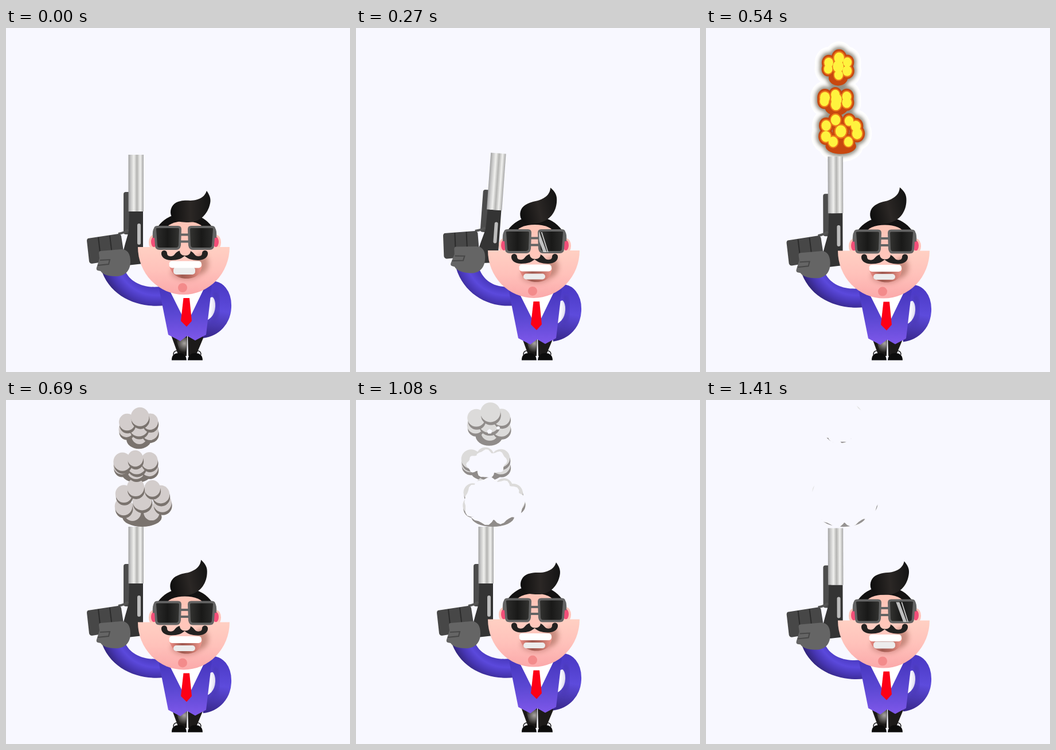
These frames come from a looping animation (600x600 px, 1440 ms). An HTML page:

```html
<!DOCTYPE html>
<html lang="en">
<head>
<meta charset="utf-8">
<title>Agent with pistol</title>
<style>
html, body { margin: 0; width: 100%; height: 100%; overflow: hidden; background: #f8f8ff; }
svg { display: block; width: 100vw; height: 100vh; }
</style>
</head>
<body>
<svg viewBox="0 0 600 600" xmlns="http://www.w3.org/2000/svg">
<defs>
  <linearGradient id="steel">
    <stop offset="0" stop-color="#a2a2a2"/><stop offset=".14" stop-color="#c4c4c4"/>
    <stop offset=".36" stop-color="#f0f0ee"/><stop offset=".56" stop-color="#b4b4b2"/>
    <stop offset=".78" stop-color="#f1f1ef"/><stop offset="1" stop-color="#a8a8a8"/>
  </linearGradient>
  <linearGradient id="suit" x2="0" y2="1">
    <stop offset="0" stop-color="#4535bd"/><stop offset=".5" stop-color="#5a47d2"/><stop offset="1" stop-color="#7f58ea"/>
  </linearGradient>
  <radialGradient id="sleeve" gradientUnits="userSpaceOnUse" cx="262" cy="395" r="99">
    <stop offset=".58" stop-color="#4a3ac0"/><stop offset=".72" stop-color="#5b49dc"/>
    <stop offset=".86" stop-color="#4736b4"/><stop offset="1" stop-color="#32257c"/>
  </radialGradient>
  <linearGradient id="hip" gradientUnits="userSpaceOnUse" x1="375" y1="445" x2="362" y2="541">
    <stop offset="0" stop-color="#4a39c4"/><stop offset=".5" stop-color="#5d4bdc"/><stop offset="1" stop-color="#38288c"/>
  </linearGradient>
  <linearGradient id="jaw" x2="0" y2="1">
    <stop offset=".5" stop-color="#ffd0c3"/><stop offset=".75" stop-color="#ffc1ba"/><stop offset="1" stop-color="#fba9aa"/>
  </linearGradient>
  <linearGradient id="lens">
    <stop offset="0" stop-color="#2f2f2e"/><stop offset=".5" stop-color="#191918"/><stop offset="1" stop-color="#353533"/>
  </linearGradient>
  <linearGradient id="quiff">
    <stop offset="0" stop-color="#0d0d0d"/><stop offset=".5" stop-color="#2b2725"/><stop offset="1" stop-color="#141414"/>
  </linearGradient>
  <linearGradient id="lip">
    <stop offset="0" stop-color="#f5928a"/><stop offset=".4" stop-color="#a05a50"/>
    <stop offset=".65" stop-color="#b86a60"/><stop offset="1" stop-color="#f2998e"/>
  </linearGradient>
  <radialGradient id="glint" gradientUnits="userSpaceOnUse" cx="311" cy="550" r="16">
    <stop offset="0" stop-color="#a9a5a2"/><stop offset="1" stop-color="#1a1817"/>
  </radialGradient>
  <filter id="soft" x="-50%" y="-50%" width="200%" height="200%"><feGaussianBlur stdDeviation="4"/></filter>
  <path id="glass" d="M264 347H300Q304 347 304 351L303 379Q302 385 297 385H268Q262 385 262 379L260 352Q259 347 264 347Z"/>
  <clipPath id="lenses"><use href="#glass"/><use href="#glass" transform="matrix(-1 0 0 1 623 0)"/></clipPath>
  <clipPath id="below"><rect x="225" y="382" width="170" height="90"/></clipPath>
  <mask id="wear" maskUnits="userSpaceOnUse" x="0" y="-50" width="600" height="700">
    <rect y="-50" width="600" height="700" fill="#fff"/><path id="holes"/>
  </mask>
</defs>
<rect width="600" height="600" fill="#f8f8ff"/>

<g id="smoke" mask="url(#wear)"></g>
<g id="fire"></g>

<path id="arm" fill="url(#sleeve)"/>
<g id="gun">
  <rect x="205" y="286" width="14" height="74" rx="4" fill="#4c4c4c"/>
  <path d="M215 320H239V411L212 414L203 395L208 376L214 355Z" fill="#343434"/>
  <rect x="213.500" y="221" width="26.500" height="99" fill="url(#steel)"/>
  <rect x="229" y="341" width="6" height="37" rx="3" fill="#bcbcbc"/>
  <path d="M196 359Q207 357 213 352" fill="none" stroke="#555" stroke-width="4"/>
  <path d="M143 367L196 359Q200 359 201 363L207 402L150 411Q146 411 145 407L141 371Q141 368 143 367Z" fill="#474747"/>
  <path d="M161 365L166 408M181 362L185 395" stroke="#2b2b2b" stroke-width="2"/>
  <path d="M165 389L200 386C211 385 217 393 217 407C217 424 207 434 190 433C177 433 168 429 165 424L160 423Q157 422 158 418L163 402L162 393Q162 389 165 389Z" fill="#656565"/>
  <path d="M164 405L181 404L179 412L160 414" fill="none" stroke="#474747" stroke-width="2"/>
</g>

<path d="M288 536H316L315 572H301ZM317 536H346L331 572H318Z" fill="#1c1a19"/>
<path d="M296 540H316L314 568H304Z" fill="url(#glint)"/>
<path d="M289 579.500C289 570 294 567 302 567S314 570 315 579.500ZM317 579.500C318 570 323 567 330 567S343 570 343 579.500Z" fill="#0c0c0c"/>
<path d="M292 570Q292 563 298 563M340 570Q340 563 334 563" fill="none" stroke="#222" stroke-width="1.500"/>

<g id="body">
  <path d="M350 458C370 448 380 468 379 487C378 508 364 524 342 527" fill="none" stroke="url(#hip)" stroke-width="28"/>
  <path d="M363 461C371 470 372 492 362 508" fill="none" stroke="#32247e" stroke-width="5" opacity=".5" filter="url(#soft)"/>
  <path d="M266 450H359L349 535L330 545L316 537L304 546L283 535Z" fill="url(#suit)"/>
  <path d="M284 455H345L315 517Z" fill="#fff"/>
  <path d="M309.500 471H320L324 511L315 521L305 511Z" fill="#fd0016"/>

  <ellipse cx="312" cy="374" rx="56" ry="51" fill="#131212"/>
  <ellipse cx="257" cy="374" rx="8" ry="13" fill="#ffc5b9"/><ellipse cx="367" cy="374" rx="8" ry="13" fill="#ffc5b9"/>
  <ellipse cx="258" cy="373" rx="5" ry="9" fill="#f34e78"/><ellipse cx="366" cy="373" rx="5" ry="9" fill="#f34e78"/>
  <path d="M276 354C281 342 295 337 312 337S343 342 348 354L362 388V405H262V388Z" fill="#fdc4b6"/>
  <ellipse cx="310" cy="382" rx="80" ry="83" fill="url(#jaw)" clip-path="url(#below)"/>
  <ellipse cx="341" cy="411" rx="12" ry="17" fill="#9b5d4d" opacity=".55" filter="url(#soft)"/>
  <ellipse cx="314" cy="426" rx="26" ry="13" fill="#a45c52" opacity=".45" filter="url(#soft)"/>
  <circle cx="308" cy="453" r="8" fill="#f38b8b"/>
  <path d="M284 412H342C341 428 332 437 315 437C297 437 288 428 284 412Z" fill="url(#lip)"/>
  <rect id="teeth" x="292" width="38" rx="5" fill="#ececec"/>
  <rect x="284.500" y="406.500" width="56.500" height="12" rx="5" fill="#fff"/>
  <path id="curl" d="M312 389C303 386 297 391 294 395C290 400 281 399 281 393C281 387 272 386 271 392C270 399 277 405 288 405C300 405 307 402 312 397Z" fill="#232221"/>
  <use href="#curl" transform="matrix(-1 0 0 1 623 0)"/>
  <path d="M304 352H321L322 388C322 394 318 397 312.500 397S303 394 303 388Z" fill="#ffc6ba"/>
  <g stroke="#646464" stroke-width="4" fill="none">
    <path d="M304 360.500H320M304 372.500H320M260 350Q257 353 258 366M363 350Q366 353 365 366"/>
    <g fill="url(#lens)"><use href="#glass"/><use href="#glass" transform="matrix(-1 0 0 1 623 0)"/></g>
  </g>
  <g clip-path="url(#lenses)"><path id="shine" d="M-9 350H-3L10 385H4ZM0 350H2L13 385H11Z" fill="#dcdcdc" opacity=".85"/></g>
</g>
<path id="hair" fill="url(#quiff)" d="M287 322C287 312 293 304 304 302C316 299 322 303 334 299C344 296 348 290 350 284C355 291 358 298 356 306C352 325 338 339 318 339C300 339 288 335 287 322Z"/>
</svg>

<script>
const LOOP = 1440, TAU = Math.PI * 2;
const $ = id => document.getElementById(id);
const set = (el, props) => { for (const k in props) el.setAttribute(k, props[k]); };
const mix = (a, b, u) => a + (b - a) * u;
const ramp = (t, a, b) => Math.min(1, Math.max(0, (t - a) / (b - a)));
const bump = (t, a, b) => Math.sin(Math.PI * ramp(t, a, b)) ** 2;
// Quick rise to 1 at the peak, then a slowly starting fall.
const swell = (t, a, peak, end) => t < peak
  ? Math.sin(ramp(t, a, peak) * Math.PI / 2)
  : 1 - ramp(t, peak, end) ** 1.6;

function add(parent, tag, props) {
  const el = document.createElementNS("http://www.w3.org/2000/svg", tag);
  set(el, props);
  return parent.appendChild(el);
}

let seed = 7;
function rand() {
  seed = (seed * 16807) % 2147483647;
  return seed / 2147483647;
}

// The column is three clouds, each a ring of puffs around a middle one.
const CLOUDS = [
  { x: 238, y: 174, rx: 38, ry: 24, n: 8 },
  { x: 228, y: 110, rx: 29, ry: 10, n: 6 },
  { x: 232, y: 43, rx: 24, ry: 17, n: 6 }
];

function makePuffs(c) {
  const list = [{ x: c.x, y: c.y, r: 18 }];
  for (let i = 0; i < c.n; i++) {
    const a = (i + .5 + .5 * (rand() - .5)) / c.n * TAU;
    list.push({ x: c.x + c.rx * Math.cos(a), y: c.y + c.ry * Math.sin(a), r: 14 + 3 * rand() });
  }
  for (const p of list) {
    // Wear starts low in the column and eats from the cloud's middle outwards.
    p.from = 800 + 290 * ramp(p.y, 200, 40) + 90 * (rand() - .3);
    p.hx = mix(p.x, c.x, .25);
    p.hy = mix(p.y, c.y, .25) + 3;
  }
  return list.sort((a, b) => b.y - a.y);
}

const puffs = CLOUDS.flatMap(makePuffs);
const smoke = $("smoke"), fire = $("fire");
const shade = add(smoke, "g", {});
const shades = [shade], lights = [];
const stems = (g, grow) => CLOUDS.forEach(c =>
  add(g, "ellipse", { cx: c.x, cy: c.y + c.ry + 6, rx: c.rx * .95 + grow, ry: 17 + grow }));

stems(shade, 0);
for (const { x, y, r } of puffs) {
  shades.push(add(smoke, "circle", { cx: x + 1, cy: y + 5, r }));
  lights.push(add(smoke, "circle", { cx: x, cy: y, r }));
}

function flames(size, grow, fill, more) {
  const g = add(fire, "g", { fill, ...more });
  for (const { x, y, r } of puffs) add(g, "circle", { cx: x, cy: y, r: r * size + grow });
  if (grow) stems(g, grow - 2);
}
flames(1, 17, "#fff");
flames(1, 6, "#4d4630", { filter: "url(#soft)", opacity: .6 });
flames(1, 1, "#c8470f");
flames(.84, 0, "#ec7a1b");
flames(.68, 0, "#fff33e");

function ragged(x, y, r, phase) {
  let d = "";
  for (let i = 0; i < 24; i++) {
    const a = i / 24 * TAU;
    const q = r * (1 + .1 * Math.sin(5 * a + phase));
    d += (i ? "L" : "M") + (x + q * Math.cos(a)).toFixed(1) + " " + (y + q * Math.sin(a)).toFixed(1);
  }
  return d + "Z";
}

const tone = (a, b, u) => `rgb(${a.map((v, i) => Math.round(mix(v, b[i], u)))})`;

function drawBlast(t) {
  const age = Math.max(0, t - 400), drift = Math.max(0, t - 840);
  const sx = 1 - Math.exp(-age / 98) + drift / 6000;
  const sy = 1 - Math.exp(-age / 71) + drift / 10000;
  const heat = 1 - ramp(t, 600, 670);
  const transform = `translate(226 218) scale(${sx} ${sy}) translate(-226 -218)`;
  set(fire, { display: age && heat ? "inline" : "none", opacity: heat, transform });
  set(smoke, { display: t >= 600 ? "inline" : "none", transform });

  const pale = ramp(t, 840, 1150);
  const dark = tone([122, 115, 110], [150, 147, 146], pale);
  const light = tone([211, 205, 204], [223, 223, 222], pale);
  shades.forEach(el => set(el, { fill: dark }));
  lights.forEach(el => set(el, { fill: light }));
  set($("holes"), {
    d: puffs.filter(p => t > p.from)
      .map((p, i) => ragged(p.hx, p.hy, p.r * 1.75 * (1 - Math.exp((p.from - t) / 130)), i))
      .join("")
  });
}

// The wrist follows the gun while the shoulder only drops.
function drawArm(tilt, drop) {
  const a = tilt * Math.PI / 180, c = Math.cos(a), s = Math.sin(a);
  const at = (x, y) => {
    const dx = x - 272, dy = y - 517;
    return `${272 + dx * c - dy * s} ${517 + dy * c + dx * s + drop}`;
  };
  set($("arm"), {
    d: `M276 ${484 + drop}C232 ${489 + drop} ${at(180, 470)} ${at(165, 418)}L${at(207, 422)}` +
       `C${at(217, 446)} 245 ${456 + drop} 276 ${450 + drop}Z`
  });
}

function draw(t) {
  const first = swell(t, 0, 420, 1120), second = swell(t, 1120, 1260, 1474);
  const bob = 7 * first + 5.8 * second;
  const drop = 4 * bump(t, 420, 600) + 5.4 * second;
  const tilt = 4.3 * bump(t, 60, 440) - .07 * drop;
  const open = ramp(t, 60, 200) * (1 - ramp(t, 1300, 1480));

  drawBlast(t);
  drawArm(tilt, drop);
  set($("gun"), { transform: `translate(0 ${drop}) rotate(${tilt} 272 517)` });
  set($("body"), { transform: `translate(0 ${bob})` });
  set($("hair"), { transform: `translate(0 ${bob * .45}) rotate(${-2.3 * bob} 310 325)` });
  set($("teeth"), { y: mix(417, 422.5, open), height: mix(13, 10, open) });
  set($("shine"), { transform: `translate(${243 + .294 * (t % 1080)} 0)` });
}

const start = performance.now();
function tick() {
  draw((performance.now() - start) % LOOP);
  requestAnimationFrame(tick);
}
draw(0);
requestAnimationFrame(tick);
</script>
</body>
</html>
```
